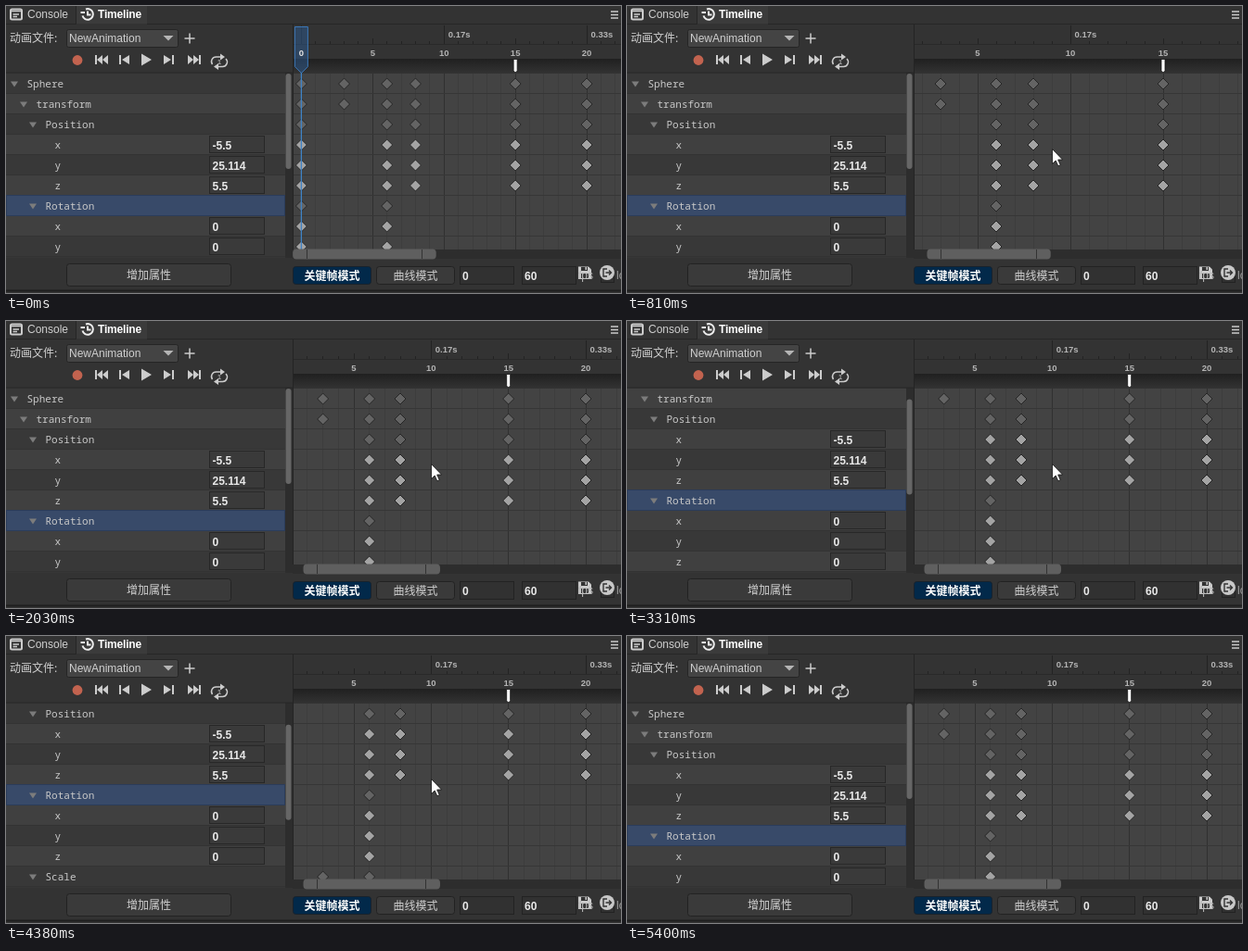
Write an HTML page that moves like this. It is 663 px wide and 310 px high and loops after 5.86 s.

```html
<!DOCTYPE html>
<html lang="zh-CN">
<head>
<meta charset="utf-8">
<style>
html, body { margin: 0; width: 100%; height: 100%; overflow: hidden; background: #333; }
svg { display: block; width: 663px; height: 310px; }
text { font: 12px "Liberation Sans", Arial, sans-serif; fill: #d0d0d0; white-space: pre; }
.cjk { font-family: "Noto Sans CJK SC", "Noto Sans CJK", sans-serif; }
.mono { font: 11px "Noto Sans Mono", monospace; fill: #c8c8c8; }
.num { font-weight: bold; fill: #e8e8e8; }
.tick { font-size: 9.5px; font-weight: bold; fill: #b4b4b4; }
.mid { text-anchor: middle; }
.box { fill: #313131; stroke: #222; }
.field { fill: #3a3a3a; stroke: #272727; }
.icon { fill: #ccc; }
.line { fill: none; stroke: #ccc; stroke-width: 1.5; }
.bright { stroke: #eee; stroke-width: 2; }
</style>
</head>
<body>
<svg viewBox="0 0 663 310">
  <defs>
    <clipPath id="listClip"><rect x="0" y="73" width="309" height="198"/></clipPath>
    <clipPath id="keyClip"><rect x="310" y="73" width="353" height="190"/></clipPath>
    <clipPath id="rightClip"><rect x="309" y="20" width="354" height="243"/></clipPath>
    <linearGradient id="shade" x2="0" y2="1">
      <stop offset="0" stop-color="#202020"/><stop offset="1" stop-color="#333"/>
    </linearGradient>
  </defs>

  <rect width="663" height="310" fill="#333"/>

  <!-- tabs -->
  <rect x="76" width="76" height="19" fill="#3b3b3b"/>
  <path d="M75.5 0V19M0 19.5H76M152 19.5H663" stroke="#262626"/>
  <rect x="5" y="3.5" width="12" height="11" rx="1.5" class="line" style="stroke-width:2"/>
  <path d="M5 5.5H17M7.5 9H14M7.5 11.5H12" class="line"/>
  <text x="23" y="13">Console</text>
  <path d="M86 3.5A5.800 5.800 0 1 1 82.500 10.500M88 5.500V9.500H91.500M80.500 7H85" class="line bright"/>
  <text x="99" y="13" style="fill:#fff;font-weight:bold;letter-spacing:-.2px">Timeline</text>
  <path d="M652 6H660M652 9.500H660M652 13H660" class="line"/>

  <!-- toolbar -->
  <text x="4" y="39" class="cjk">动画文件:</text>
  <rect x="65.500" y="25.500" width="120" height="19" rx="2" fill="#444" stroke="#252525"/>
  <text x="68" y="39">NewAnimation</text>
  <path d="M169.500 32H180.500L175 37.500Z" fill="#b5b5b5"/>
  <path d="M192.500 35H203.500M198 29.500V40.500" class="line"/>
  <circle cx="77" cy="58.500" r="5.400" fill="#c2634f"/>
  <path class="icon" d="M96 53h2v10h-2zM104 53v10l-6-5zM110 53v10l-6-5z
    M122 53h2v10h-2zM133 53v10l-8-5z M146 51.500v13l11-6.500z
    M170 53v10l8-5zM179 53h2v10h-2z M196 53v10l6-5zM202 53v10l6-5zM208 53h2v10h-2z"/>
  <path class="line" d="M222.500 63a5 5 0 0 1 4 -8H232M237 57a5 5 0 0 1 -3.500 8.500H228"/>
  <path class="icon" d="M231 51.500v7l5-3.500zM229 62v7l-5-3.500z"/>
  <text x="230" y="63" class="mid" style="font-size:8px">1</text>

  <!-- property list -->
  <rect y="72" width="309" height="200" fill="#363636"/>
  <g id="list" clip-path="url(#listClip)"></g>
  <rect x="301" y="72" width="8" height="200" fill="#2d2d2d"/>
  <rect id="vthumb" x="301.500" y="73" width="6" height="103" rx="3" fill="#666"/>
  <path d="M0 72H309" stroke="#272727"/>

  <!-- keyframe area -->
  <rect x="309" y="57" width="354" height="16" fill="url(#shade)"/>
  <rect x="309" y="73" width="354" height="190" fill="#434343"/>
  <g id="keys" clip-path="url(#keyClip)"></g>
  <g id="ruler" clip-path="url(#rightClip)"></g>
  <path d="M309.500 20V273" stroke="#242424"/>
  <rect x="309" y="263" width="354" height="10" fill="#2d2d2d"/>
  <g id="hthumb"></g>

  <!-- footer -->
  <rect x="65.500" y="278.500" width="177" height="24" rx="3" fill="#3a3a3a" stroke="#222"/>
  <text x="154" y="294.500" class="cjk mid">增加属性</text>
  <rect x="309.500" y="281.500" width="84" height="19" rx="3" fill="#02294a" stroke="#18222c"/>
  <text x="351.500" y="295.500" class="cjk mid" style="font-weight:bold;fill:#fff">关键帧模式</text>
  <rect x="399.500" y="281.500" width="84" height="19" rx="3" fill="#3a3a3a" stroke="#222"/>
  <text x="441.500" y="295.500" class="cjk mid">曲线模式</text>
  <rect x="489.500" y="281.500" width="58" height="19" class="box"/>
  <text x="492" y="296" class="num">0</text>
  <rect x="556.500" y="281.500" width="58" height="19" class="box"/>
  <text x="559" y="296" class="num">60</text>
  <rect x="641.500" y="284.500" width="14" height="14" class="box"/>
  <text x="658" y="295" style="fill:#a0a0a0">loop</text>
  <path d="M617 281.500h11l3 3v10.500h-14z" fill="#ccc"/>
  <path d="M620 282h7v4h-7zM620 289h8v5h-8z" fill="#333"/>
  <path d="M624.500 282h1.500v3h-1.500z" fill="#ccc"/>
  <text x="617" y="295" style="fill:#b8b8b8">fps</text>
  <circle cx="648" cy="288" r="8" fill="#c8c8c8"/>
  <path d="M648 284H644V292H648M646.500 288H652.500M650 285.500L652.500 288L650 290.500" fill="none" stroke="#333" stroke-width="1.400"/>
  <path d="M0 307.500H663" stroke="#1e1e1e" stroke-width="2"/>

  <path id="cursor" d="M.5 .5V16.500L4.200 13L6.800 18.800L9.200 17.700L6.700 12H11.500Z" fill="#fff" stroke="#111" stroke-width=".8"/>
</svg>

<script>
const LOOP = 5860, ROW = 22, TOP = 73;
const $ = id => document.getElementById(id);

// label, depth, keyed frames, value
const POS = [0, 6, 8, 15, 20, 24], ROT = [0, 6], SCL = [0, 3, 6];
const ALL = [0, 3, 6, 8, 15, 20, 24];
const axes = (keys, values) => values.map((v, i) => ["xyz"[i], 3, keys, v]);
const rows = [
  ["Sphere", 0, ALL], ["transform", 1, ALL],
  ["Position", 2, POS], ...axes(POS, ["-5.5", "25.114", "5.5"]),
  ["Rotation", 2, ROT], ...axes(ROT, ["0", "0", "0"]),
  ["Scale", 2, SCL], ...axes(SCL, ["1", "1", "1"])
];
const SELECTED = 6;

// [time, visible range]: one frame is 200 / range pixels wide
const zoom = [[0, 13], [620, 12], [715, 11], [810, 10],
  [1090, 11], [1175, 12], [1260, 13], [1345, 14], [1430, 15],
  [1890, 14], [1960, 13], [2030, 12]];
// [time, rows scrolled]
const scroll = [[0, 0], [3310, 1], [3380, 3], [3450, 4], [3910, 2], [3980, 0],
  [4380, 2], [4455, 3], [4530, 4], [4860, 2], [4930, 0]];
// [time, x, y], off stage when x is negative
const pointer = [[0, -50, 0], [70, 568, 288], [140, 547, 263], [210, 520, 231],
  [280, 491, 196], [350, 469, 168], [420, 458, 154],
  [5260, 474, 180], [5330, 513, 243], [5400, -50, 0]];

const at = (steps, t) => steps.findLast(s => s[0] <= t);

const rect = (x, y, w, h, fill) =>
  `<rect x="${x}" y="${y}" width="${w}" height="${h}" fill="${fill}"/>`;
const text = (x, y, cls, s) => `<text x="${x}" y="${y}" class="${cls}">${s}</text>`;
const vline = (x, y1, y2, color) =>
  `<path d="M${Math.floor(x) + .5} ${y1}V${y2}" stroke="${color}"/>`;
const diamond = (x, y, fill) =>
  `<path d="M${x} ${y - 6}l6 6l-6 6l-6 -6z" fill="${fill}" stroke="#262626"/>`;

function drawList(first) {
  let out = "";
  rows.forEach(([label, depth, , value], i) => {
    const y = TOP + (i - first) * ROW, x = 5 + depth * 10;
    out += rect(0, y, 301, ROW, i % 2 ? "#404040" : "#383838");
    out += rect(0, y + ROW - 1, 301, 1, "#333");
    if (i === SELECTED) {
      out += `<rect x=".5" y="${y - .5}" width="300" height="${ROW}" fill="#384a69" stroke="#2b3c5a"/>`;
    }
    if (value === undefined) {
      out += `<path d="M${x} ${y + 8.5}h8l-4 6z" fill="#7c7c7c"/>`;
    } else {
      out += `<rect x="219.500" y="${y + 1.5}" width="59" height="18" class="field"/>`;
      out += text(222.5, y + 16, "num", value);
    }
    out += text(x + 17.5, y + 15, "mono", label);
  });
  $("list").innerHTML = out;
  $("vthumb").setAttribute("y", TOP + first * 11.4);
}

function drawKeys(x0, step, first) {
  let out = "";
  for (let f = 0; f < 30; f++) {
    out += vline(x0 + f * step, TOP, 263, f % 5 === 0 ? "#303030" : "#3d3d3d");
  }
  for (let i = 1; i < 10; i++) out += rect(309, TOP + i * ROW - 1, 354, 1, "#363636");
  rows.forEach(([, depth, keys], i) => {
    const y = TOP + 11 + (i - first) * ROW;
    for (const f of keys) out += diamond(x0 + f * step, y, depth === 3 ? "#a4a4a4" : "#646464");
  });
  $("keys").innerHTML = out;
}

function drawRuler(x0, step, range) {
  let out = rect(309, 41, 354, 1, "#292929");
  for (let f = 0; f < 30; f++) {
    const x = x0 + f * step;
    out += vline(x, f % 10 === 0 ? 21 : f % 5 === 0 ? 35 : 38, 41, "#232323");
    if (f && f % 10 === 0) out += text(x + 4.5, 33.5, "tick", (f / 60).toFixed(2) + "s");
    if (f && f % 5 === 0) out += text(x, 53.5, "tick mid", f);
  }
  const end = x0 + 15 * step;
  out += `<path d="M${end - 2} 57.500h4v12a2 2 0 0 1 -4 0z" fill="#fff" stroke="#161616" stroke-width=".8"/>`;
  out += `<path d="M${x0 - 7} 22.500h14v43l-7 7l-7 -7z" fill="#2c5a90" fill-opacity=".5" stroke="#3c78b8"/>`;
  out += `<path d="M${x0} 72V263" stroke="#3f83c6" stroke-width="1.300"/>`;
  out += `<text x="${x0}" y="53.500" class="tick mid" style="fill:#e4e4e4">0</text>`;
  $("ruler").innerHTML = out;

  const left = 309 + 7.1 * Math.max(0, 318.7 - x0) / step, width = 62.5 + 7.08 * range;
  $("hthumb").innerHTML =
    `<rect x="${left}" y="262.500" width="${width}" height="11" rx="4" fill="#5f5f5f"/>` +
    vline(left + 15, 263, 273, "#333") + vline(left + width - 15, 263, 273, "#333");
}

let shown = "";
function render(t) {
  const range = at(zoom, t)[1], first = at(scroll, t)[1];
  const [, px, py] = at(pointer, t);
  const step = 200 / range;
  // zooming keeps the frame near the pointer in place, never past frame 0
  const x0 = Math.min(318.9, t < 1890 ? 453 - 8.75 * step : 428 - 8.18 * step);
  const state = [x0, range, first].join();
  if (state !== shown) {
    shown = state;
    drawList(first);
    drawKeys(x0, step, first);
    drawRuler(x0, step, range);
  }
  $("cursor").setAttribute("transform", `translate(${px} ${py})`);
}

const start = performance.now();
function tick() {
  render((performance.now() - start) % LOOP);
  requestAnimationFrame(tick);
}
tick();
</script>
</body>
</html>
```
